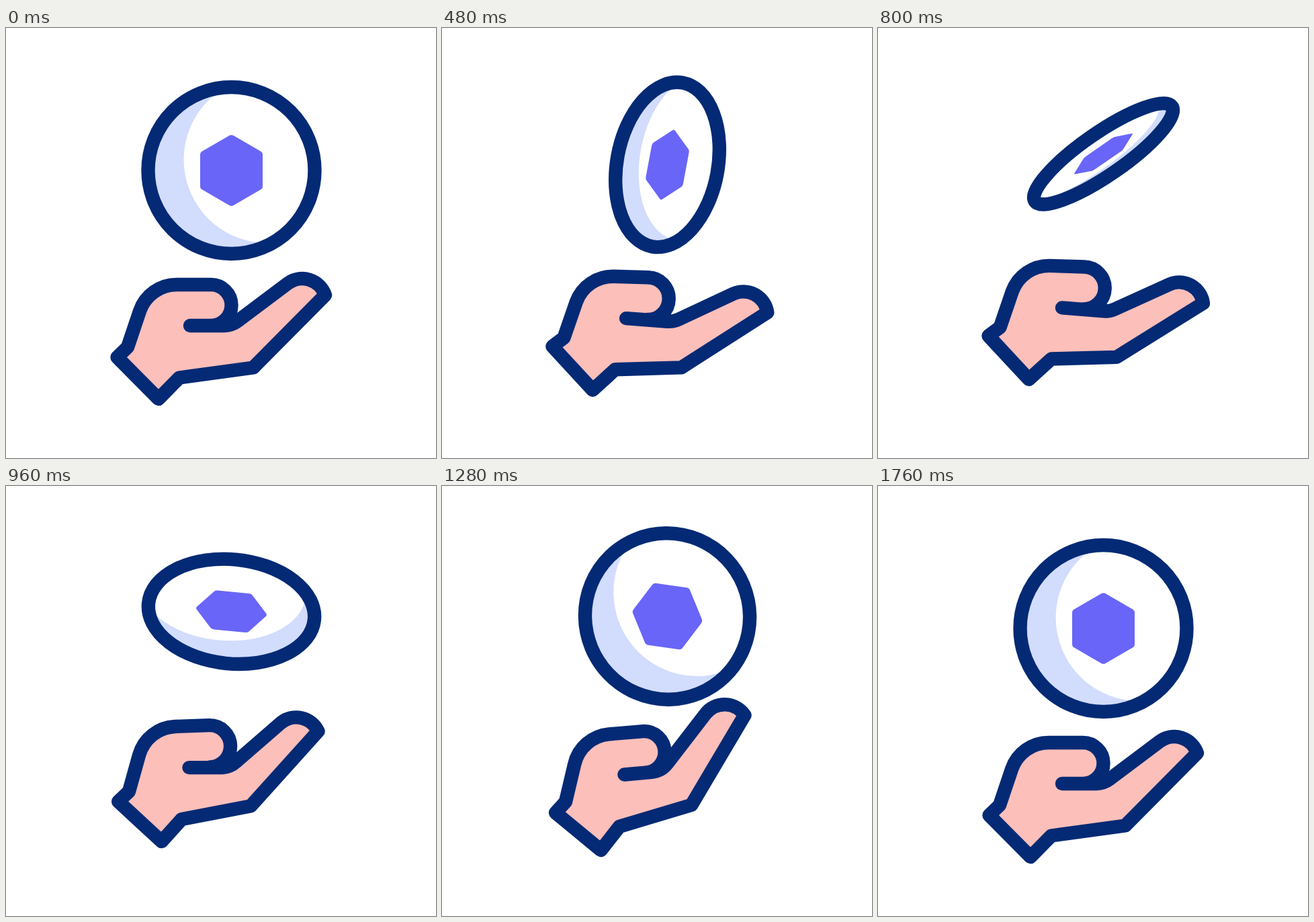
These frames come from a looping animation (640x640 px, 1.96 s). An HTML page:

```html
<!DOCTYPE html>
<html lang="en">
<head>
<meta charset="utf-8">
<title>Coin toss</title>
<style>
  html, body { margin: 0; height: 100%; overflow: hidden; background: #fff; }
  svg { display: block; width: 100%; height: 100%; }
  .line { stroke: #042a75; stroke-width: 20.4; stroke-linecap: round; stroke-linejoin: round; }
</style>
</head>
<body>
<svg viewBox="0 0 640 640">
  <g id="coin">
    <path fill="#d2dcfd" d="M-8.4-123.7A124 124 0 1 0 61.4 107.7A124 124 0 0 1-8.4-123.7"/>
    <path fill="#6965f8" stroke="#6965f8" stroke-width="12" stroke-linejoin="round"
      d="M0-46.8L40.5-23.4V23.4L0 46.8L-40.5 23.4V-23.4Z"/>
    <circle class="line" r="124" fill="none" vector-effect="non-scaling-stroke"/>
  </g>
  <path id="hand" class="line" fill="#fdbfba"/>
</svg>
<script>
const LOOP = 1960, STEP = 40, START = 120, END = 1760;
const HALF = (END - START) / 2, THIRD = (END - START) / 3;
const coin = document.getElementById('coin');
const hand = document.getElementById('hand');

// Each joint of the outline: path command, then its x,y at rest, bent down and bent up
const ARC = r => `A${r} ${r} 0 0 `;
const joints = [
  ['M', 274, 443, 274.1, 441, 271.4, 447.3],
  ['L', 325, 443, 337.6, 446.5, 311.8, 443.6],
  [ARC(33) + '0 ', 344.5, 436.4, 353.4, 444.2, 335, 431],
  ['L', 419.4, 380.2, 436.5, 409.4, 391.8, 357],
  [ARC(36) + '1 ', 475, 397.5, 486, 439.3, 450.3, 358.6],
  ['L', 368, 505.5, 354, 516.2, 371.3, 492.4],
  ['L', 258, 520.5, 257.6, 516.9, 264.1, 524.7],
  ['L', 227, 552, 223.8, 547.1, 236.7, 559.9],
  ['L', 165.5, 490, 164.2, 481.8, 169.1, 504.2],
  ['L', 181, 475, 181.4, 469.3, 184, 487.8],
  ['L', 199, 421.5, 200, 416, 197.1, 432.2],
  [ARC(58) + '1 ', 254, 382, 256.5, 378.3, 248.3, 387.2],
  ['L', 305, 382, 307.5, 380.2, 299.3, 382.9],
  [ARC(1) + '1 ', 305, 443, 305.7, 443.2, 301.9, 444.6]
];

const clamp = s => Math.min(1, Math.max(0, s));
const ease = (s, power = 3) =>
  s < .5 ? (2 * s) ** power / 2 : 1 - (2 - 2 * s) ** power / 2;

function drawHand(time, rise) {
  const lift = 25.7 * ease(rise, 2.6);
  const phase = (time - START) / THIRD;
  const from = Math.min(2, Math.floor(phase));
  const to = (from + 1) % 3;
  const k = ease(phase - from);
  const d = joints.map(([command, ...xy]) => {
    const mix = axis => xy[2 * from + axis] * (1 - k) + xy[2 * to + axis] * k;
    return command + mix(0).toFixed(2) + ' ' + (mix(1) - lift).toFixed(2);
  });
  hand.setAttribute('d', d.join(''));
}

function drawCoin(time, rise) {
  const lift = 25.2 * ease(rise);
  const spin = 180 * ease((time - START) / (END - START), 2.6);
  const turn = 1 - (1 - clamp((time - 178) / 1205)) ** 1.2;
  const width = Math.cos(Math.PI * turn);
  // The back face carries the same picture, half a turn round
  const height = width < 0 ? -1 : 1;
  coin.setAttribute('transform',
    `translate(335.5 ${212 - lift}) rotate(${spin}) scale(${width} ${height})`);
}

function frame(now) {
  const tick = Math.floor(now % LOOP / STEP) * STEP;
  const time = Math.min(END, Math.max(START, tick));
  const rise = 1 - Math.abs(time - START - HALF) / HALF;
  drawHand(time, rise);
  drawCoin(time, rise);
  requestAnimationFrame(frame);
}

frame(performance.now());
</script>
</body>
</html>
```
